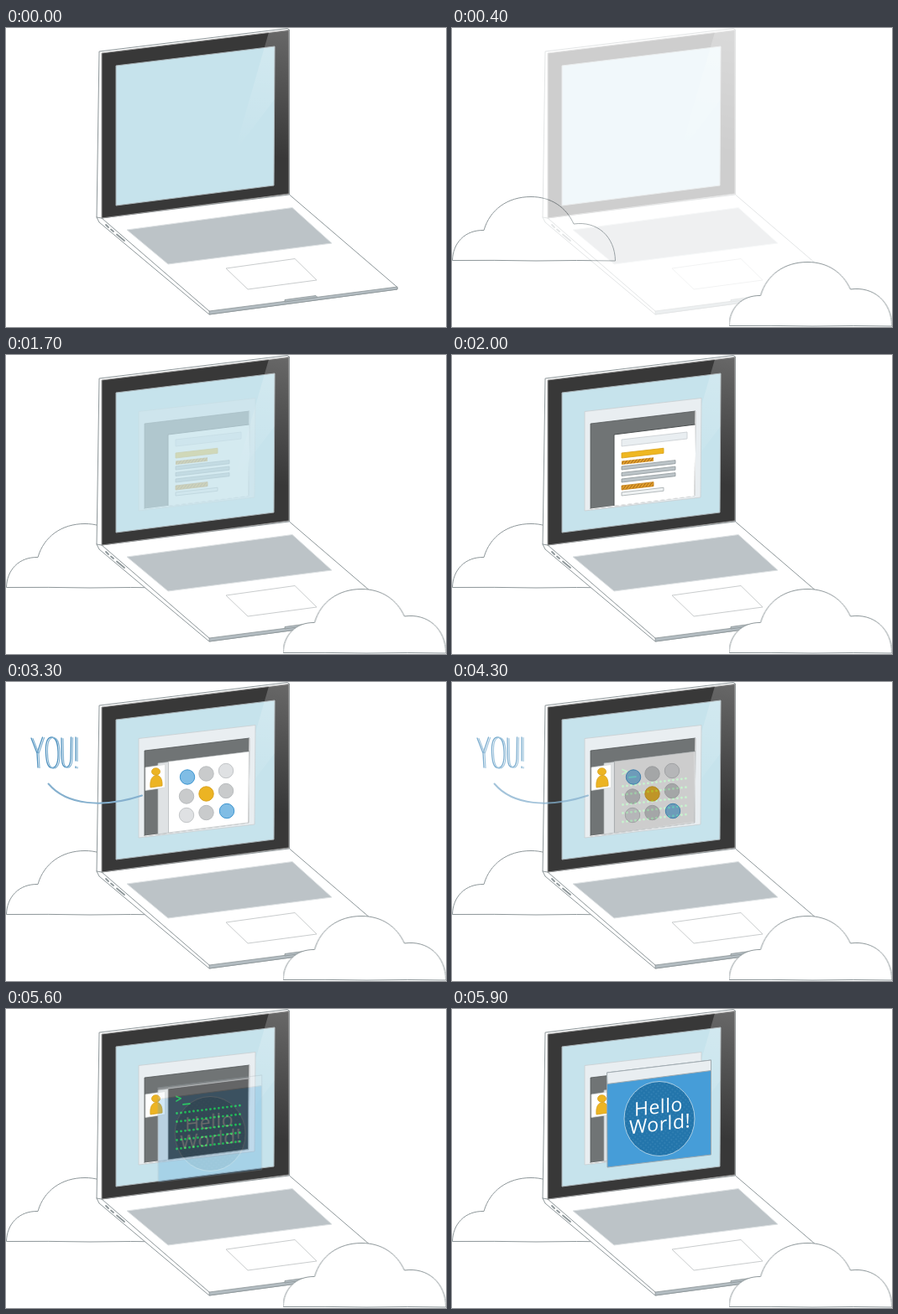
An HTML page that plays this animation: 524 by 357 pixels, repeating every 8 s.

```html
<!DOCTYPE html>
<html lang="en">
<head>
<meta charset="utf-8">
<title>Laptop in the clouds</title>
<style>
  html, body { margin: 0; width: 100%; height: 100%; overflow: hidden; background: #fff; }
  svg { display: block; width: 100%; height: 100%; }

  .clouds, .laptop, .editor, .profile, .label, .terminal, .browser {
    animation: 8s step-end infinite;
  }
  .clouds { animation-name: clouds; }
  .laptop { animation-name: laptop; }
  .editor { animation-name: editor; }
  .profile { animation-name: profile; }
  .label { animation-name: label; }
  .terminal { animation-name: terminal; }
  .browser { animation-name: browser; }

  /* Every fade moves in hard 100 ms steps. */
  @keyframes clouds {
    0% { opacity: 0; }
    1.25% { opacity: 0; animation-timing-function: steps(3, start); }
    5%, 100% { opacity: 1; }
  }
  @keyframes laptop {
    0% { opacity: 1; }
    1.25% { opacity: 0; }
    5% { opacity: 0; animation-timing-function: steps(4, start); }
    10%, 100% { opacity: 1; }
  }
  @keyframes editor {
    0% { opacity: 0; }
    21.25% { opacity: 0; animation-timing-function: steps(4, start); }
    26.25%, 100% { opacity: 1; }
  }
  @keyframes profile {
    0% { opacity: 0; }
    37.5% { opacity: 0; animation-timing-function: steps(4, start); }
    42.5%, 100% { opacity: 1; }
  }
  @keyframes label {
    0% { opacity: 0; }
    37.5% { opacity: 0; animation-timing-function: steps(4, start); }
    42.5% { opacity: 1; }
    53.75% { opacity: 1; animation-timing-function: steps(4, start); }
    58.75%, 100% { opacity: 0; }
  }
  @keyframes terminal {
    0% { opacity: 0; }
    53.75% { opacity: 0; animation-timing-function: steps(4, start); }
    58.75%, 100% { opacity: 1; }
  }
  @keyframes browser {
    0% { opacity: 0; transform: translate(-5px, 24px); }
    70% { opacity: 0; transform: translate(-5px, 24px); animation-timing-function: steps(4, start); }
    75%, 100% { opacity: 1; transform: none; }
  }

  .outline { fill: #fff; stroke: #8d9699; stroke-linejoin: round; }
  .bezel { fill: #383838; stroke: #999; }
  .pale { fill: #e9eef1; stroke: #c9ced1; stroke-width: .8; }
  .blue { fill: #80bde5; stroke: #3f96d0; }
  .grey { fill: #c9cbcc; stroke: #b9bcbe; }
  .light { fill: #dfe1e3; stroke: #c3c6c8; }
  .gold { fill: #ecb423; stroke: #d9a11c; }
  .line { fill: none; stroke-linecap: round; stroke-linejoin: round; }
</style>
</head>
<body>
<svg viewBox="0 0 524 357" preserveAspectRatio="none">
  <defs>
    <path id="cloud" d="M.5 277.5C1 257 15 241 38 241.500C45 217 66 201.500 94 201.500C118 201.500 136 214 145 234C173 230 194 249 194.500 278Q150 277 100 278Q50 277 .5 277.500Z"/>
    <linearGradient id="glare" gradientUnits="userSpaceOnUse" x1="330" y1="2" x2="300" y2="150">
      <stop stop-color="#fff" stop-opacity=".24"/>
      <stop offset="1" stop-color="#fff" stop-opacity="0"/>
    </linearGradient>
    <pattern id="hatch" width="3" height="3" patternUnits="userSpaceOnUse" patternTransform="rotate(40)">
      <rect width="3" height="3" fill="#e3a02a"/>
      <path d="M0 0V3" stroke="#a86c20" stroke-width="2"/>
    </pattern>
    <pattern id="dots" width="4" height="4" patternUnits="userSpaceOnUse" patternTransform="rotate(38)">
      <rect width="4" height="4" fill="#2375ab"/>
      <circle cx="2" cy="2" r=".6" fill="#5a9fcb"/>
    </pattern>
    <g id="youLines">
      <path d="M30 67L37 85L43.500 66M37 85L38 102"/>
      <path d="M54 66C48 66 47 76 47.500 85C48 96 50 103 55 102.500C61 102 62.500 94 62 83C61.500 73 60 66 54 66Z"/>
      <path d="M66 67L66.500 92C67 105 76 105 77 92L77.500 66"/>
      <path d="M83 66L83 94M83 101V102.500"/>
    </g>
  </defs>

  <use href="#cloud" class="clouds outline"/>

  <g class="laptop">
    <path class="outline" d="M111 28L335 .5L337.500 2V199L466 309.500V312L242 342L111 232L108 226Z"/>
    <path d="M242 338L466 309V312L242 342Z" fill="#b3bcc1" stroke="#8d9699" stroke-width=".8"/>
    <path d="M332 327V324.500L369 319.500L371 321.500Z" fill="#b3bcc1" stroke="#8d9699" stroke-width=".8"/>
    <path class="line" d="M108 226L114 227L242 338M114 227L337 199" stroke="#8d9699"/>
    <path class="line" d="M119 235L122 238M125 240.500L128 243M132 246.500L141 254" stroke="#8d9699" stroke-width="1.800"/>
    <path class="bezel" d="M114 30L337 2.500V198L114 227Z"/>
    <path d="M131 45L320 22L319 188L131 212Z" fill="#c6e3ec" stroke="#aab4b8"/>
    <path d="M313 5L337 2.500V170L320 172V85L272 148Z" fill="url(#glare)"/>
    <path d="M144 241L341 214.500L388 257L193 282Z" fill="#bcc3c7" stroke="#dde1e3"/>
    <path d="M262 287L344 275.500L370 301L288 312Z" fill="#fff" stroke="#c9cccd"/>

    <g class="editor">
      <path class="pale" d="M158 67.500L297 51.500L296 170L158 186Z"/>
      <path d="M165 82L290 67L289 168L165 184Z" fill="#707475" stroke="#55595a" stroke-width=".8"/>
      <path d="M193 95L289.500 83L288.500 168L193 180Z" fill="#fff"/>
      <path d="M290 67L289 168L165 184" fill="none" stroke="#fff"/>
      <path d="M193 95L289.500 83M193 95V180" fill="none" stroke="#4c5051"/>
      <g transform="matrix(1 -.115 0 1 202 101)" stroke-width=".8">
        <rect class="pale" width="78" height="8"/>
        <rect y="16" width="50" height="6" fill="#efb720" stroke="#d9a11c"/>
        <rect y="25.500" width="38" height="4.500" fill="url(#hatch)"/>
        <g fill="#bcc4c8" stroke="#90999d">
          <rect y="32" width="64" height="4"/>
          <rect y="39.500" width="64" height="4"/>
          <rect y="47" width="64" height="4"/>
        </g>
        <rect y="55" width="38" height="5" fill="url(#hatch)" stroke="#c98218"/>
        <rect y="63" width="50" height="4" fill="#eff2f3" stroke="#a5acaf"/>
      </g>
    </g>

    <g class="profile">
      <path d="M193 95L289.500 83L288.500 168L193 180Z" fill="#fff" stroke="#b9bdbf" stroke-width=".7"/>
      <path d="M181 97L193.500 95.500V180L181 182Z" fill="#dfe2e4" stroke="#b4b9bb" stroke-width=".7"/>
      <path d="M166 102L189.500 98.500V126L166 129.500Z" fill="#fff" stroke="#d5d8d9" stroke-width=".7"/>
      <g class="gold" stroke-width=".8">
        <ellipse cx="178.500" cy="107" rx="5" ry="4.300"/>
        <path d="M172 126C171 117 174 112 179 111.500C184 111 186.500 117 186 124Z"/>
      </g>
      <g stroke-width="1">
        <circle class="blue" cx="216" cy="113.500" r="8.700"/>
        <circle class="grey" cx="238.500" cy="109.500" r="8.700"/>
        <circle class="light" cx="262" cy="106" r="8.700"/>
        <circle class="grey" cx="215" cy="136.500" r="8.700"/>
        <circle class="gold" cx="238.500" cy="133.500" r="8.700"/>
        <circle class="grey" cx="262" cy="130" r="8.700"/>
        <circle class="light" cx="215" cy="159" r="8.700"/>
        <circle class="grey" cx="238.500" cy="156" r="8.700"/>
        <circle class="blue" cx="263" cy="154" r="8.700"/>
      </g>
    </g>

    <g class="terminal">
      <path d="M193 95L289 83L288.500 167.500L193 180Z" fill="#383838" stroke="#a5a8a9" stroke-width=".8"/>
      <text transform="matrix(1 -.1 0 1 201 113)" font-family="'Noto Sans Mono', monospace" font-size="15.500" font-weight="700" fill="#22d03e">&gt;_</text>
      <path class="line" d="M203.500 124.500L280 115M203.500 134.500L280 125.500M203.500 146.500L280 137.500M203.500 156.500L280 147.500M203.500 167L280 158" stroke="#22d03e" stroke-width="2.800" stroke-dasharray="0 5.030"/>
    </g>
  </g>

  <use href="#cloud" class="clouds outline" x="329.500" y="78"/>

  <g class="label line" role="img" aria-label="YOU!" stroke="#4f91be">
    <use href="#youLines" stroke-width="1.300"/>
    <use href="#youLines" x="2" y=".5" stroke="#83b3d3" stroke-width="1.200"/>
    <path d="M50.500 121.500C72 147 115 151 162 135.500" stroke="#85b0ce" stroke-width="2"/>
  </g>

  <g class="browser">
    <path d="M184.500 76L308.500 61V174L185 189Z" fill="#469dd8" stroke="#9aa7ae"/>
    <path d="M184.500 76L308.500 61V73.500L185 89.500Z" fill="#e9eef1" stroke="#a2abb0"/>
    <ellipse cx="247" cy="131" rx="42" ry="44.500" fill="url(#dots)" stroke="#a9cde3"/>
    <g font-family="'Open Sans', sans-serif" font-size="23" font-weight="500" letter-spacing=".5" fill="#fff">
      <text transform="matrix(1 -.115 0 1 217 128)">Hello</text>
      <text transform="matrix(1 -.115 0 1 211 149.500)">World!</text>
    </g>
  </g>
</svg>
</body>
</html>
```
